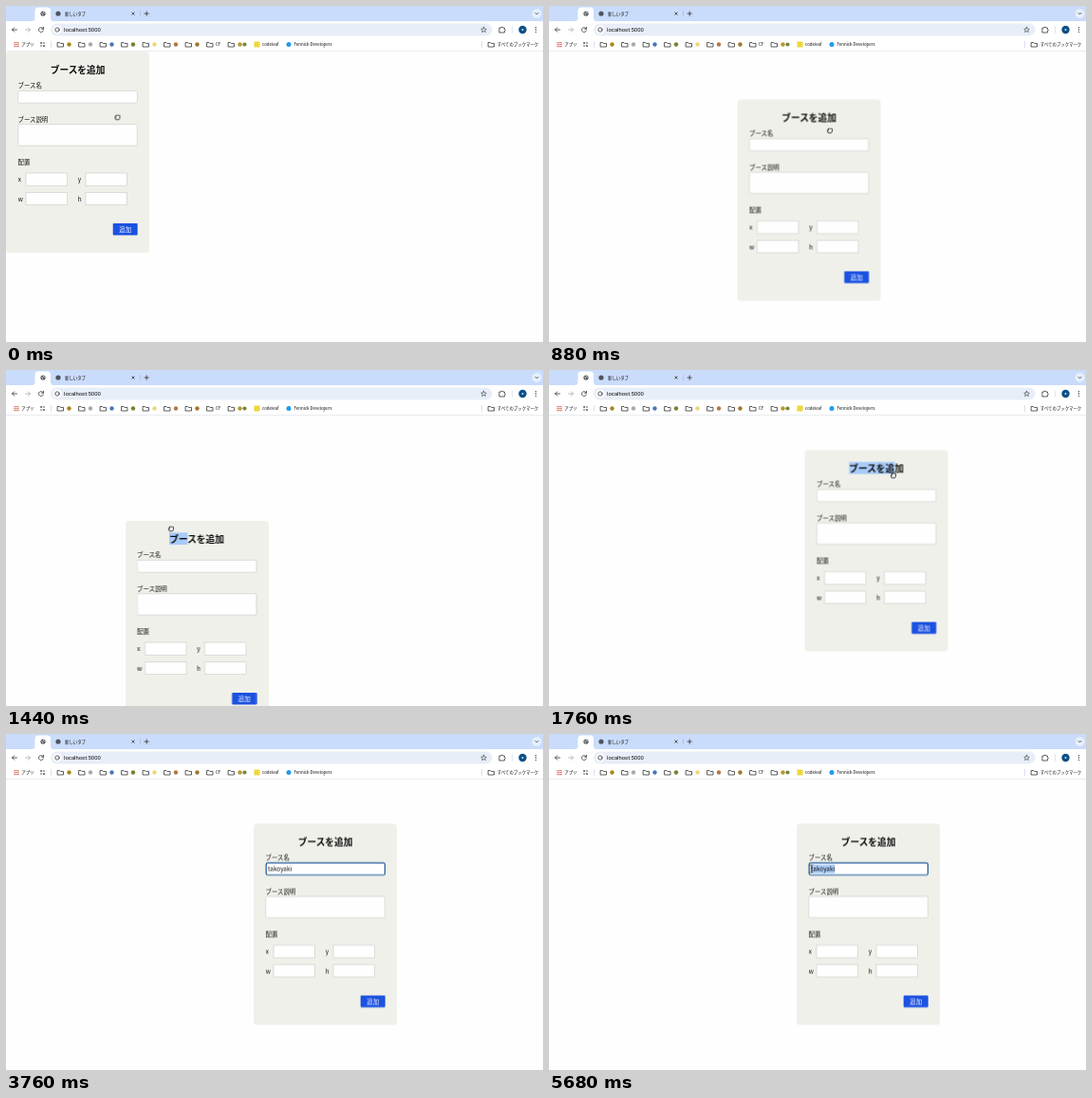
Write an HTML page that moves like this. It is 566 px wide and 354 px high and loops after 5.76 s.

```html
<!DOCTYPE html>
<html lang="ja">
<head>
<meta charset="utf-8">
<title>Booth form</title>
<style>
html, body { margin: 0; width: 100%; height: 100%; overflow: hidden; background: #fefefe; }
svg { display: block; width: 566px; height: 354px; }
text { font: 500 6.4px "Noto Sans CJK JP", "Noto Sans CJK", sans-serif; fill: #0c0c0c; white-space: pre; }
.small { font-size: 4.4px; }
.url { font: 5.9px Roboto, sans-serif; }
.title { font-size: 9.7px; font-weight: 700; text-anchor: middle; }
.mid { text-anchor: middle; }
.line { fill: none; stroke: #333; stroke-width: .8; stroke-linecap: round; stroke-linejoin: round; }
.field { fill: #fefefe; stroke: #c9c9c7; stroke-width: .6; }
.sel { fill: #a8cbf8; }
</style>
</head>
<body>
<svg viewBox="0 0 566 354">
  <defs>
    <path id="folder" class="line" d="M-3-2h2l.8.9h3.2v3.6h-6z"/>
    <g id="globe"><circle r="2.6" fill="#50545a"/><path d="M-1.8-.4l1.4.6.2 1.5M.2-1.9l.1 1 1.5.4" fill="none" stroke="#fff" stroke-width=".7"/></g>
  </defs>

  <g id="panel">
    <rect width="151" height="212" rx="3.5" fill="#f0f0ea"/>
    <rect id="titleSel" class="sel" x="46.7" y="12.3" width="58" height="12.8"/>
    <text class="title" x="75.6" y="22.6">ブースを追加</text>
    <text x="12.6" y="38.3">ブース名</text>
    <rect class="field" x="12.8" y="41.4" width="125.5" height="12.8" rx="1.2"/>
    <rect id="ring" x="13.2" y="41.4" width="125.2" height="12.6" rx="1.8" fill="#fff" stroke="#1d5c9c" stroke-width="1.2"/>
    <rect id="inputSel" class="sel" x="15" y="43.2" height="9.2"/>
    <text id="typed" x="15" y="49.8"></text>
    <rect id="caret" x="15" y="43.6" width=".7" height="8" fill="#222"/>
    <text x="12.6" y="73.9">ブース説明</text>
    <rect class="field" x="12.8" y="76.7" width="125.5" height="22.4" rx="1.2"/>
    <text x="12.6" y="118.8">配置</text>
    <g id="coords"></g>
    <rect x="112.7" y="181" width="26" height="12.4" rx=".8" fill="#1c52e0"/>
    <text class="mid" x="125.7" y="189.7" style="fill:#fff">追加</text>
  </g>

  <rect width="566" height="48" fill="#fff"/>
  <rect width="566" height="16" fill="#cadcfb"/>
  <path d="M27 16q3.5 0 3.5-3.500V5q0-3.500 3.500-3.500h9.500q3.500 0 3.500 3.500v7.500q0 3.500 3.500 3.500z" fill="#fff"/>
  <use href="#globe" x="39" y="8"/>
  <circle cx="55" cy="8" r="2.6" fill="#50545a"/>
  <text class="small" x="62" y="9.7">新しいタブ</text>
  <path class="line" d="M132.800 6.800l2.400 2.400m0-2.400l-2.400 2.400M146 8h4.400M148.200 5.800v4.400"/>
  <path d="M141.500 5v6" stroke="#9db3d6" stroke-width=".6"/>
  <circle cx="559.5" cy="8" r="5" fill="#e6effd"/>
  <path class="line" d="M558 7.300l1.500 1.500 1.500-1.500"/>

  <path class="line" d="M11.500 25h-5m2.200-2.200L6.500 25l2.200 2.200M39.300 24a2.500 2.500 0 1 0 .1 1.900M39.500 22.300v1.900h-1.900"/>
  <path class="line" style="stroke:#aaa" d="M20.500 25h5m-2.200-2.200l2.200 2.200-2.200 2.200"/>
  <rect x="47" y="18.5" width="465.5" height="13" rx="6.5" fill="#e8eef8"/>
  <circle cx="54" cy="25" r="4.6" fill="#fff"/>
  <circle class="line" cx="54" cy="25" r="2.2"/>
  <text class="url" x="61" y="27">localhost:5000</text>
  <path class="line" style="stroke-width:.6" d="M503.500 22.200l.8 1.900 2 .2-1.500 1.300.5 2-1.800-1.100-1.800 1.100.5-2-1.500-1.300 2-.2z"/>
  <path class="line" d="M520.300 23h1.600a.9.900 0 0 1 1.800 0h1.700v1.600a.9.900 0 0 1 0 1.800v1.600h-5.100z"/>
  <path d="M533.500 21.500v7" stroke="#cddaf0" stroke-width=".7"/>
  <circle cx="544.5" cy="25" r="4.2" fill="#0b4f86"/>
  <circle cx="544.5" cy="25" r="1" fill="#cfe2f3"/>
  <path d="M558.500 22.700v.01m0 2.290v.01m0 2.290v.01" stroke="#333" stroke-width="1.3" stroke-linecap="round"/>

  <path d="M8.500 38.600h5m-5 2h5m-5 2h5" stroke="#d0553f" stroke-width="1.2" stroke-dasharray="1.2 .7"/>
  <text class="small" x="16.3" y="42.2">アプリ</text>
  <path class="line" d="M36.500 39h1.300m1.600 0h1.300m-4.200 3h1.300m1.600 0h1.300m-3.600-3.500v1m2.900 2v1"/>
  <path d="M47.700 37v7M501.500 37v7" stroke="#c6d3e8" stroke-width=".7"/>
  <g id="folders"></g>
  <text class="small" x="221" y="42.2">CF</text>
  <rect x="261.5" y="37.5" width="6" height="6" fill="#f0d63c"/>
  <text class="small" x="270" y="42.2">codeleaf</text>
  <circle cx="298" cy="40.5" r="2.5" fill="#1d9bf0"/>
  <text class="small" x="303.5" y="42.2">Fennick Developers</text>
  <use href="#folder" x="511.5" y="40.5"/>
  <text class="small" x="517.8" y="42.2">すべてのブックマーク</text>
  <path d="M0 47.600h566" stroke="#dfe3e8" stroke-width=".8"/>

  <g id="hand">
    <path transform="scale(.85)" d="M-2.300 3L-3 .6q-.4-1.200.7-1.200l.6.700-.4-2q.7-.9 1.200 0 .5-1.200 1.300-.2.900-.8 1.400.2.900-.5 1.200.5L2.700 1.400 2 3z" fill="#fff" stroke="#111" stroke-width="1"/>
  </g>
  <path id="beam" class="line" style="stroke:#222;stroke-width:.7" d="M-1.300-4.200q1.300 0 1.300 1v6.400q0 1-1.300 1M1.300-4.200Q0-4.200 0-3.200M0 3.200q0 1 1.300 1"/>
</svg>
<script>
const LOOP = 5760, STEP = 80;
const $ = id => document.getElementById(id);
const svgNS = 'http://www.w3.org/2000/svg';

function add(parent, tag, attrs, text = '') {
  const node = document.createElementNS(svgNS, tag);
  for (const key in attrs) node.setAttribute(key, attrs[key]);
  node.textContent = text;
  return parent.appendChild(node);
}

// Holds each value until the next listed time.
function track(node, prop, stops) {
  const frames = stops.map(([ms, value]) => ({ offset: ms / LOOP, [prop]: value, easing: 'step-end' }));
  frames.push({ offset: 1, [prop]: stops.at(-1)[1] });
  node.animate(frames, { duration: LOOP, iterations: Infinity });
}
const move = ([ms, x, y]) => [ms, `translate(${x}px, ${y}px)`];
const path = (node, stops) => track(node, 'transform', stops.map(move));
const show = (node, stops) => track(node, 'opacity', stops);

// Samples a straight, eased move once per step.
function glide(from, to, [x0, y0], [x1, y1]) {
  const stops = [];
  for (let ms = from; ms <= to; ms += STEP) {
    const p = (ms - from) / (to - from), e = p * p * (3 - 2 * p);
    stops.push([ms, x0 + (x1 - x0) * e, y0 + (y1 - y0) * e]);
  }
  return stops;
}

[['x', 0, 0], ['y', 63, 0], ['w', 0, 20.5], ['h', 63, 20.5]].forEach(([name, x, y]) => {
  add($('coords'), 'text', { x: 12.8 + x, y: 137.2 + y }, name);
  add($('coords'), 'rect', { class: 'field', x: 21 + x, y: 128 + y, width: 43.4, height: 13.2 });
});

['#a88420', '#aaa', '#4777b8', '#718530', '#ecd67c', '#b27843', '#a2752c', '', '#b59a32'].forEach((fill, i) => {
  const x = 57.5 + i * 22.5;
  add($('folders'), 'use', { href: '#folder', x, y: 40.5 });
  if (fill) add($('folders'), 'circle', { cx: x + 9, cy: 40.5, r: 2.2, fill });
});
add($('folders'), 'circle', { cx: 251.5, cy: 40.5, r: 2.1, fill: '#77863a' });

// Time, panel position, then the pointer's offset within the panel.
const drag = [
  [720, 30, 54, 98, 33], [800, 115, 78, 99, 33], [880, 198.5, 98.5, 97.5, 32.5],
  [960, 262, 122, 112, 44], [1040, 238, 160, 72, 40], [1120, 166, 112, 72, 12],
  [1200, 184, 52.5, 136, 30.5], [1280, 262, 76, 112, 52], [1360, 225, 150, 64, 44],
  [1440, 125.5, 159, 48.5, 8], [1520, 134, 96, 92, 12], [1600, 205, 58, 122, 28],
  [1680, 258, 70, 104, 32], [1760, 269.5, 84.5, 93.5, 26.5], [1840, 264, 91, 94, 29],
  [1920, 261, 94.5, 95, 30]
];
path($('panel'), [[0, 0, 48], ...drag]);
path($('hand'), [
  ...glide(0, 640, [117.5, 117], [98, 81]),
  ...drag.map(([ms, x, y, dx, dy]) => [ms, x + dx, y + dy]),
  ...glide(2000, 2400, [356, 124.5], [343, 114])
]);
show($('hand'), [[0, 1], [2800, 0]]);

const chars = n => `scaleX(${n / 6})`;
$('titleSel').style.transformOrigin = '46.7px 0';
track($('titleSel'), 'transform', [[0, chars(0)], [1200, chars(6)], [1440, chars(2)],
  [1520, chars(4)], [1600, chars(6)], [1680, chars(5)], [2080, chars(0)]]);

const typed = $('typed'), word = [...'takoyaki'], typeAt = 3040, selectAt = 4560;
word.forEach((letter, i) =>
  show(add(typed, 'tspan', {}, letter), [[0, 0], [typeAt + i * STEP, 1]]));
const widthOf = n => n ? typed.getSubStringLength(0, n) : 0;
const full = widthOf(word.length);

show($('ring'), [[0, 0], [2800, 1]]);
show($('caret'), [[0, 0], [2880, 1], [3760, 0], [4160, 1], [selectAt, 0]]);
path($('caret'), [[0, 0, 0], ...word.map((_, i) => [typeAt + i * STEP, widthOf(i + 1), 0])]);

show($('beam'), [[0, 0], [2800, 1], [typeAt, 0], [4160, 1]]);
path($('beam'), [[0, 341, 142], ...glide(4160, 4400, [341, 156], [303, 143]),
  ...glide(selectAt, 5120, [303, 143], [276.5, 142])]);

// The selection grows leftwards from the end of the word.
$('inputSel').setAttribute('width', full);
$('inputSel').style.transformOrigin = `${15 + full}px 0`;
track($('inputSel'), 'transform', [[0, 'scaleX(0)'], ...word.map((_, i) =>
  [selectAt + i * STEP, `scaleX(${1 - widthOf(word.length - 1 - i) / full})`])]);
</script>
</body>
</html>
```
